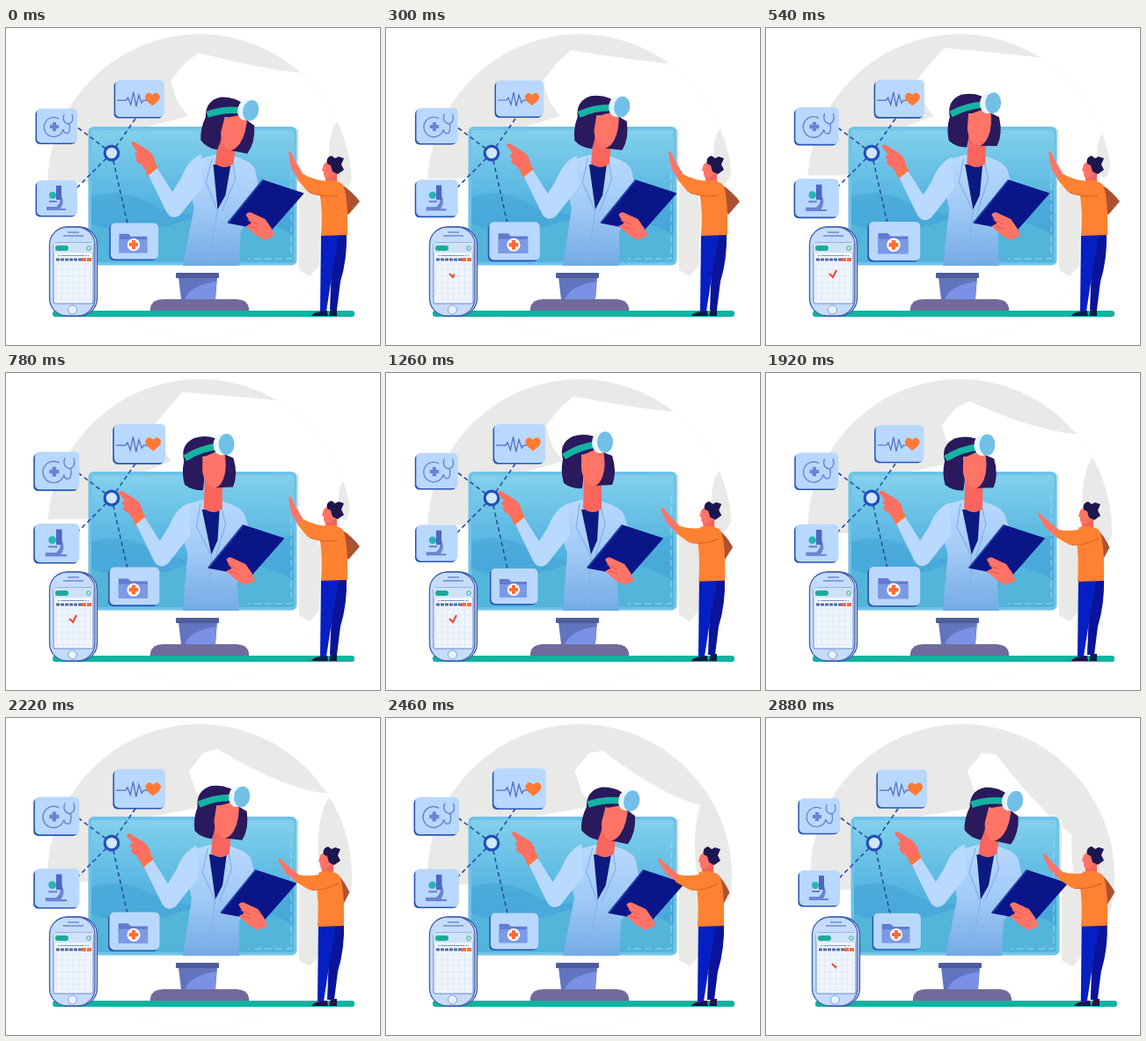
Write an HTML page that moves like this. It is 425x360 px and loops after 2.94 s.

```html
<!DOCTYPE html>
<html lang="en">
<head>
<meta charset="utf-8">
<title>Online doctor</title>
<style>
html, body { margin: 0; width: 100%; height: 100%; overflow: hidden; background: #fff }
svg { display: block; width: 425px; height: 360px }
</style>
</head>
<body>
<svg viewBox="0 0 425 360">
<defs>
  <clipPath id="disc"><circle cx="220" cy="180" r="173"/></clipPath>
  <linearGradient id="sky" x2="0" y2="1"><stop stop-color="#82d0ec"/><stop offset=".55" stop-color="#54b4e0"/><stop offset="1" stop-color="#45a8d6"/></linearGradient>
  <linearGradient id="coatFill" x2="0" y2="1"><stop stop-color="#b9d9ff"/><stop offset=".45" stop-color="#a3cbf7"/><stop offset="1" stop-color="#74abe4"/></linearGradient>
</defs>
<g id="scene">
  <g clip-path="url(#disc)">
    <rect width="425" height="360" fill="#e9e9e7"/>
    <path id="sea" fill="#fff"/>
    <rect id="south" x="40" width="293" height="200" fill="#fff"/>
    <ellipse id="east" cy="145" fill="#e9e9e7"/>
    <path d="M333 178L350 180 358 200 356 270 345 282 333 275Z" fill="#e9e9e7"/>
  </g>

  <!-- monitor and desk -->
  <rect x="53" y="321" width="343" height="7" rx="3" fill="#10b3a0"/>
  <path d="M164 321V318Q166 308 178 308H262Q274 308 276 318V321Z" fill="#706b9c"/>
  <path d="M196 283H240L238 308H199Z" fill="#6274bd"/>
  <path d="M203 308Q210 292 239 288L238 308Z" fill="#7b91e6"/>
  <rect x="193" y="278" width="49" height="6" rx="1" fill="#4f5c9c"/>
  <rect x="93.500" y="112" width="237" height="157.500" rx="6" fill="#6fc3e8"/>
  <rect x="97" y="116" width="230" height="150" rx="3" fill="url(#sky)"/>
  <path d="M97 192Q130 180 165 200T240 204 327 185V266H97Z" fill="#3f9fd4" opacity=".45"/>
  <path d="M97 222Q140 240 200 220T327 235V266H97Z" fill="#5fc2dc" opacity=".55"/>
  <path d="M324 140V262H275" fill="none" stroke="#a9e0f2" stroke-width=".8" stroke-dasharray="8 4"/>

  <!-- links -->
  <path d="M120 142L80 112M120 142L147 103M120 142L80 182M120 142L138 222" stroke="#294da9" stroke-width="1.600" stroke-dasharray="5 3.500"/>
  <circle cx="120" cy="142" r="7.800" fill="#cfe8fb" stroke="#2450b8" stroke-width="3.200"/>

  <!-- doctor -->
  <g id="body">
    <path d="M222 144L205 149 195 170 206 205 201 270H265L262 232 280 190 270 160Q264 150 241 145Z" fill="url(#coatFill)"/>
    <path d="M222 155H242L240 190 233 206Z" fill="#0b1a80"/>
    <path d="M220 148L216 175 233 208 229 270M243 148L249 172 238 208" fill="none" stroke="#84b1e8" stroke-width="1.200"/>
    <path d="M225 120H245V154Q236 162 224 154Z" fill="#f9655d"/>
  </g>
  <g id="head">
    <path d="M242 88L257 94Q263 113 257 127L238 128Z" fill="#2a195d"/>
    <path d="M201 98Q196 80 212 72 232 66 246 78V90L222 93Q226 112 223 131 211 132 202 125 198 112 201 98Z" fill="#2a195d"/>
    <path d="M222 94L246 83Q251 105 246 118 242 128 236 128 225 126 222 110Z" fill="#ff7466"/>
    <path d="M202 95Q220 83 241 81" fill="none" stroke="#14b3a2" stroke-width="7.500"/>
    <ellipse cx="243" cy="79" rx="9" ry="12" fill="#eaf6fc"/>
    <ellipse cx="249" cy="78.500" rx="9" ry="12" fill="#72c0e8"/>
  </g>
  <g id="arm">
    <path d="M127 136Q129 132 134 136L147 144Q155 150 155 163L147 171 139 160Q129 155 134 151 128 148 134 145Z" fill="#ff6f61"/>
    <path d="M143 167L154 157 158 164 148 175Z" fill="#ff7548"/>
    <path d="M207 148Q192 154 184 175L174 191 157 164 147 172 167 213Q173 224 183 217L209 184Z" fill="#b9d9ff"/>
  </g>
  <g id="board">
    <path d="M229 221L268 173 314 188 277 230Z" fill="#0a1688" stroke="#0a1688" stroke-width="1.500" stroke-linejoin="round"/>
    <path d="M229 221L268 173" stroke="#2349b5" stroke-width="1.500"/>
    <path d="M249 212Q252 207 258 211L271 217 278 227 282 236 270 241 259 234 249 225 255 222Z" fill="#ff7466"/>
    <path d="M251 218L263 223M253 225L263 228" stroke="#e9534f"/>
  </g>

  <!-- cards -->
  <g id="c0">
    <g fill="none" stroke="#6b83d2" stroke-width="1.300">
      <path d="M3-9A11 11 0 1 0 8 3Q9 9 14 7 16 4 15-3M9-14Q6-5 14-3 21-5 18-14"/>
    </g>
    <path d="M-4-5H0V-2H3V2H0V5H-4V2H-7V-2H-4Z" fill="#6b83d2"/>
  </g>
  <g id="c1">
    <path d="M-24 1H-14L-12-2-9 6-6-8-3 8 0-5 3 4 5 1H9" fill="none" stroke="#536dc2" stroke-width="1.200"/>
    <path d="M15 7Q5 0 7-4 10-10 15-5 20-10 23-4 25 0 15 7Z" fill="#ff7b35"/>
  </g>
  <g id="c2">
    <path d="M-11 13H11V11H5Q10 3 6-3H4Q6 4 0 9H-11Z" fill="#6b83d2"/>
    <path d="M0-15H6V1H0Z" fill="#4c67c2"/><path d="M-8 2H1V4H-8Z" fill="#6b83d2"/>
    <circle cx="-4" cy="-4" r="4" fill="#25b5b4"/>
  </g>
  <g id="c3">
    <path d="M-16-9H-6L-3-6H15V12H-16Z" fill="#607bd1"/><path d="M-16-3H15V12H-16Z" fill="#7c99e4"/>
    <circle cy="3" r="7" fill="#fff"/>
    <path d="M-2-2H2V1H5V5H2V8H-2V5H-5V1H-2Z" fill="#ff6d3a"/>
  </g>

  <!-- phone -->
  <rect x="52" y="226" width="51.500" height="101" rx="20" fill="#dfeafc" stroke="#3655a8" stroke-width="1.300"/>
  <rect x="49.500" y="226" width="51.500" height="101" rx="20" fill="#c5dcfb" stroke="#3f5eb2" stroke-width="1.300"/>
  <path d="M70 232H83M65 236H88" stroke="#6f8bd0" stroke-width="1.500"/>
  <rect x="54" y="244" width="45" height="69" rx="2" fill="#f0f5fd" stroke="#6d87c7"/>
  <path d="M54 244H99V255H54Z" fill="#cfe2f8"/>
  <rect x="56" y="247" width="15" height="6" rx="3" fill="#1bab9a"/>
  <circle cx="94" cy="250" r="2.300" fill="none" stroke="#3cac9f"/>
  <path d="M59 258.500H94" stroke="#8095bd" stroke-dasharray="2 1 27 1"/>
  <path d="M57 263H86" stroke="#536a9d" stroke-width="3" stroke-dasharray="4 1"/>
  <path d="M86 263H97" stroke="#f36e45" stroke-width="4" stroke-dasharray="5 1"/>
  <path id="grid" stroke="#dde6f1" stroke-width=".8"/>
  <path id="tick" d="M72 279L76 283 80 275" fill="none" stroke="#ef4b37" stroke-width="2.200" pathLength="1" stroke-dasharray="1 2"/>
  <circle cx="75.500" cy="320" r="5" fill="#e7f1fd" stroke="#849fd9"/>

  <!-- visitor -->
  <path d="M357 321H365L366 327H347Q349 323 357 322ZM369 319H376V327H367Z" fill="#171749"/>
  <g id="legs">
    <path d="M366 233H387Q388 262 380 288L376 320H368L370 270Z" fill="#0a149a"/>
    <path d="M358 233H379L372 270 364 322H357Z" fill="#061fc2"/>
  </g>
  <g id="torso">
    <path id="elbow" d="M381 178Q391 183 402 197L389 212 383 206Z" fill="#ac5132"/>
    <path d="M362 165L376 164V178H364Z" fill="#f46358"/>
    <path d="M361 155Q366 149 373 154L374 165 366 171Q360 170 361 163L359 162Z" fill="#ff7466"/>
    <path d="M365 154Q363 147 370 145L374 148 378 146 384 148 381 155 384 161 377 166 371 163 369 156Z" fill="#1c164f"/>
    <path d="M360 174Q373 171 382 177 389 187 388 235L358 236Q360 204 356 187Z" fill="#ff8131"/>
  </g>
  <g id="reach">
    <path d="M321 141Q324 138 327 148L337 165 332 172 324 159Z" fill="#ff7466"/>
    <path d="M336 165L331 172 343 186Q357 191 373 193L380 182 369 174Q351 174 336 165Z" fill="#ff8131"/>
    <path d="M345 187Q362 193 377 190" fill="none" stroke="#d56027"/>
  </g>
</g>
</svg>
<script>
const LOOP = 2940, STEP = 60;
const $ = id => document.getElementById(id);
const set = (id, attrs) => Object.entries(attrs).forEach(([k, v]) => $(id).setAttribute(k, v));
const move = (id, transform) => set(id, { transform });
// Eased 0 to 1 from time a over d ms
const ease = (t, a, d) => {
  const x = Math.max(0, Math.min(1, (t - a) / d));
  return x * x * (3 - 2 * x);
};

const CARDS = [
  { x: 57, y: 112, w: 47, h: 40, peak: 800 },
  { x: 151, y: 81, w: 55, h: 42, peak: 1000 },
  { x: 57, y: 194, w: 47, h: 41, peak: 750 },
  { x: 145, y: 243, w: 54, h: 41, peak: 500 }
];

CARDS.forEach(({ w, h }, i) => {
  const box = (dx, dy, fill) =>
    `<rect x="${-w / 2 + dx}" y="${-h / 2 + dy}" width="${w - 1}" height="${h - 1}" rx="5" fill="${fill}"/>`;
  $('c' + i).insertAdjacentHTML('afterbegin', box(0, 1, '#2955b9') + box(1.5, -.5, '#b9d8ff'));
});

let grid = '';
for (let i = 0; i < 7; i++) grid += `M${57 + i * 6.5} 268V309M57 ${268 + i * 6.8}H96`;
set('grid', { d: grid });

// The land shrinks to its least at 700 ms, then spreads over the globe
function drawGlobe(t) {
  const land = t < 700 ? .35 * (1 - t / 700) : (t - 700) / 2180;
  const coast = 168 + 60 * land, top = 21 + 20 * land;
  const endX = 305 + 86 * land, endY = 180 - Math.sqrt(173 ** 2 - (endX - 220) ** 2);
  set('sea', { d: `M150 115L${coast + 18} 100 ${coast + 6} 84 ${coast - 2} 60 ${coast + 14} 40 ${coast + 30} ${top}
    Q${endX - 50} ${endY - 5} ${endX} ${endY}H420V330H333V115Z` });
  set('south', { y: 165 + 30 * land });
  set('east', { cx: 385 - 10 * land, rx: 6 + 25 * land, ry: 20 + 60 * land });
}

function drawDoctor(t) {
  const turn = 1 - ease(t, -163, 1090) + ease(t, 1794, 740);
  const skew = .125 * turn;
  move('body', `matrix(1 0 ${-skew} 1 ${270 * skew} 0)`);
  move('head', `translate(${13 * turn} ${10 * Math.sqrt(turn)}) rotate(${15 * turn} 235 150)`);
  move('arm', `translate(${16 * turn} ${-5 * turn})`);
  move('board', `translate(${25 * turn})`);
}

function drawVisitor(t) {
  const lean = ease(t, 950, 500) - ease(t, 2780, 300);
  move('legs', `translate(${-3 * lean})`);
  move('torso', `translate(${-4 * lean} ${lean})`);
  move('elbow', `translate(383) scale(${1 - .4 * lean} 1) translate(-383)`);
  move('reach', `rotate(${-20 * lean} 370 185)`);
}

function draw(t) {
  move('scene', `translate(${Math.max(0, (t - 2700) / 60)})`);
  drawGlobe(t);
  drawDoctor(t);
  drawVisitor(t);
  CARDS.forEach(({ x, y, peak }, i) => {
    const pulse = .5 + .5 * Math.cos(4 * Math.PI * (t - peak) / LOOP);
    move('c' + i, `translate(${x} ${y}) scale(${1 + .1 * pulse})`);
  });
  const tick = t < 1600 ? ease(t, 120, 300) : ease(t, 2760, 240);
  $('tick').style.display = tick ? '' : 'none';
  set('tick', { 'stroke-dashoffset': 1 - tick });
}

const start = performance.now();
function frame() {
  const t = (performance.now() - start) % LOOP;
  draw(Math.floor(t / STEP) * STEP);
  requestAnimationFrame(frame);
}
frame();
</script>
</body>
</html>
```
